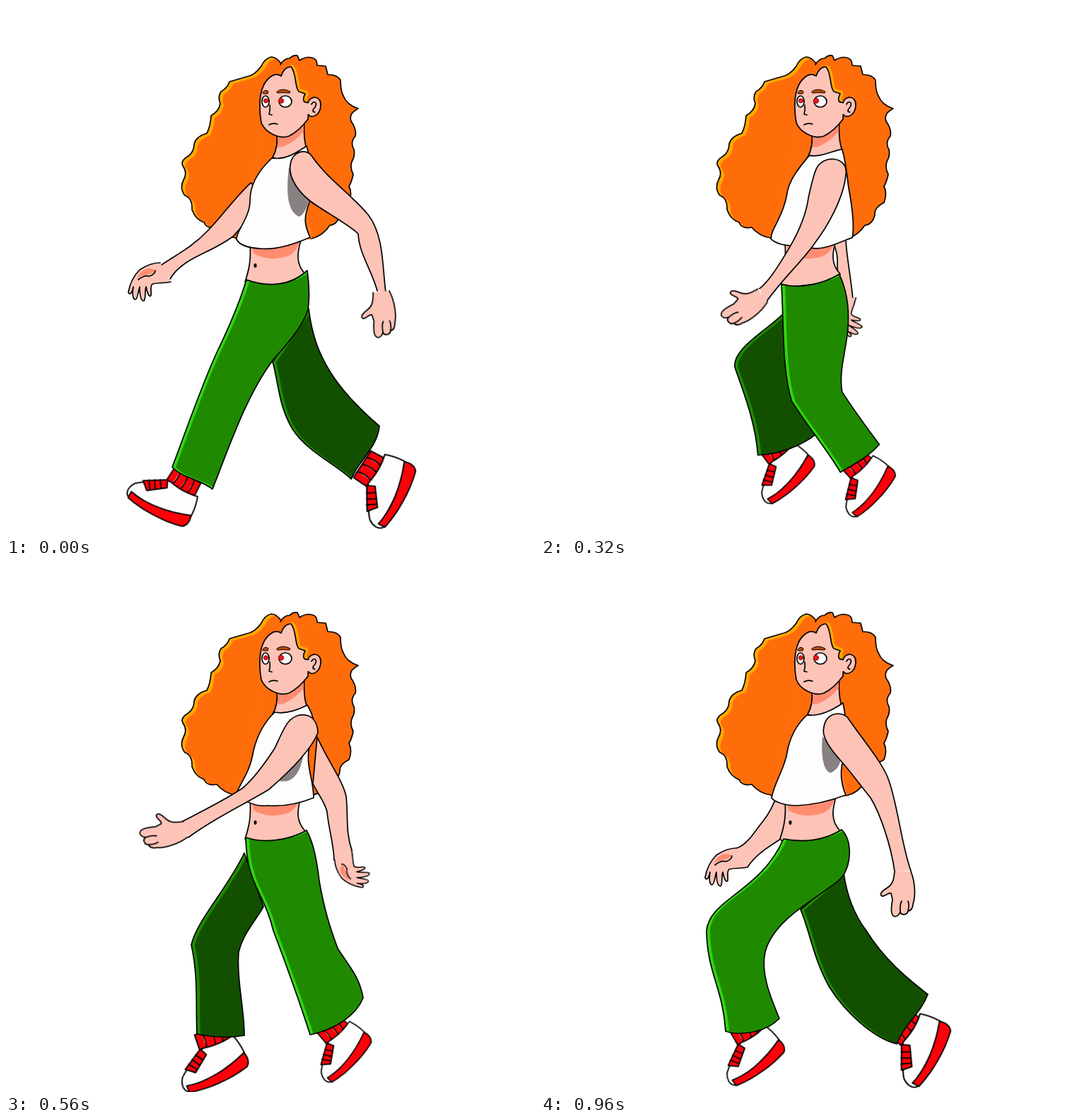
Animation, 748 px wide and 748 px high, one loop 1.04 s. Source, as an HTML page without scripts:

```html
<!DOCTYPE html>
<html lang="en">
<head>
<meta charset="utf-8">
<title>Walk cycle</title>
<style>
html,body{margin:0;width:100%;height:100%;overflow:hidden;background:#fff}
svg{display:block;width:100%;height:100%;fill:none;stroke:#000;stroke-width:1.7;stroke-linejoin:round;stroke-linecap:round}
.skin{fill:#fdc3b7}.blush{fill:#ff8c70;stroke:none}.white{fill:#fdfdfd}.red{fill:#fe0009}
.orange{fill:#ff6d0a}.gold{fill:#ffa800}.green{fill:#1f8a00}.lime{fill:#2fd40c}.dark{fill:#125000}
.flat{stroke:none}

/* seven key poses --a to --g; the steps fill in the frames between them */
.shape{d:var(--a);animation:shape 1.04s steps(2) infinite}
.move{transform:var(--a);animation:move 1.04s steps(2) infinite}
@keyframes shape{
0%,to{d:var(--a)}
15.38%{d:var(--b);animation-timing-function:steps(3)}
38.46%{d:var(--c)}
53.84%{d:var(--d);animation-timing-function:steps(1)}
61.53%{d:var(--e)}
76.92%{d:var(--f)}
92.3%{d:var(--g);animation-timing-function:steps(1)}
}
@keyframes move{
0%,to{transform:var(--a)}
15.38%{transform:var(--b);animation-timing-function:steps(3)}
38.46%{transform:var(--c)}
53.84%{transform:var(--d);animation-timing-function:steps(1)}
61.53%{transform:var(--e)}
76.92%{transform:var(--f)}
92.3%{transform:var(--g);animation-timing-function:steps(1)}
}
.near-leg{
--a:path("M340,387C370,398 402,396 426,374C429,395 429,415 427,430C418,455 400,475 378,500C340,550 315,625 292,683C272,668 250,668 235,652C255,600 275,540 298,490C315,455 330,420 340,387Z");
--b:path("M340,394C365,398 398,393 421,378C427,395 427,415 419,435C405,460 370,490 351,516C370,560 395,620 415,660C390,668 355,675 328,670C325,620 285,555 271,505C272,485 320,435 340,394Z");
--c:path("M340,393C365,401 398,394 422,380C433,400 440,430 442,460C446,500 446,525 463,560C478,577 495,586 510,600C500,622 485,635 471,654C445,632 420,610 396,585C375,530 355,455 340,393Z");
--d:path("M339,388C365,397 400,392 425,378C436,398 440,425 443,450C450,490 458,515 469,545C485,570 500,585 505,615C495,640 465,660 430,667C415,620 395,565 378,520C365,465 340,455 339,388Z");
--e:path("M341,388C370,398 405,393 427,379C433,395 430,410 426,420C412,450 385,465 375,488C390,530 415,590 440,638C425,655 395,665 367,673C355,620 315,550 304,493C310,455 330,420 341,388Z");
--f:path("M343,390C370,398 402,393 425,378C440,395 440,420 430,440C400,465 350,475 323,498C325,545 355,595 385,628C360,645 325,662 291,661C275,600 250,560 244,478C255,445 315,435 343,390Z");
--g:path("M343,390C372,396 402,392 425,377C440,392 440,425 425,445C400,470 330,500 317,550C310,580 325,615 337,644C320,662 285,670 261,662C257,600 235,580 234,520C238,475 310,465 343,390Z")}
.far-leg{
--a:path("M428,428C433,470 445,495 457,515C475,545 500,570 528,594C525,625 500,640 488,669C470,650 425,630 405,598C385,565 385,530 377,503Z");
--b:path("M405,455C412,490 430,530 445,555C460,580 475,600 486,617C465,638 440,652 412,655C400,625 378,575 365,545C358,530 352,520 351,512Z");
--c:path("M352,462C330,480 315,488 300,505C305,550 325,580 343,598C318,615 285,625 254,625C255,570 240,530 228,492C230,460 300,430 338,397Z");
--d:path("M364,486C350,510 335,525 329,550C326,590 337,630 337,668C315,672 290,670 270,666C268,620 272,585 262,540C270,505 310,465 337,410Z");
--e:path("M395,465C393,490 392,510 391,530C385,580 370,640 365,675C340,680 315,680 292,678C287,620 290,570 281,515C285,490 305,470 314,452Z");
--f:path("M430,436C431,480 430,510 433,545C440,590 455,640 459,682C435,684 395,684 369,678C366,640 358,610 360,580C364,540 366,520 366,480Z");
--g:path("M428,438C433,475 445,500 460,520C485,560 515,585 547,610C535,640 515,650 503,680C470,672 430,635 408,600C385,560 380,520 367,490Z")}
.near-arm{
--a:path("M525,403C518,375 499,350 498,322C480,305 440,285 428,274C405,255 400,235 402,225C404,205 425,200 433,213C455,245 490,268 512,295C535,325 532,370 537,405");
--b:path("M353,443C365,420 367,395 374,375C385,345 386,310 385,285C384,265 384,250 385,238C388,210 425,208 428,240C428,285 420,320 417,338C408,375 385,425 373,455");
--c:path("M287,378C305,370 325,345 340,325C355,305 370,285 375,262C382,245 386,232 392,225C405,210 435,215 433,232C430,265 395,310 375,330C350,355 320,365 290,402");
--d:path("M250,365C275,352 310,335 335,318C350,305 365,285 380,262C388,245 394,230 400,224C415,208 440,212 441,240C430,268 395,300 372,320C340,340 295,360 258,388");
--e:path("M268,383C290,372 310,358 330,342C350,320 362,300 370,272C378,255 384,240 391,228C405,205 437,208 437,242C428,275 390,315 362,345C335,365 305,378 283,405");
--f:path("M358,442C368,425 370,410 376,395C390,360 398,340 397,300C394,275 392,255 392,240C398,215 437,215 437,238C437,280 434,310 426,335C415,370 385,420 381,455");
--g:path("M500,436C495,400 480,355 466,332C450,312 435,292 426,282C408,262 396,245 400,232C403,210 428,208 436,222C455,250 485,285 492,308C505,345 510,400 523,435")}
.far-arm{
--a:path("M217,368C240,352 262,342 285,318C305,298 320,275 346,250L370,270C345,300 330,315 322,325C290,350 250,355 232,386");
--b:path("M296,404C310,395 318,380 325,370C335,355 345,345 355,320L385,330C375,355 355,380 342,390C330,402 320,425 307,430");
--c:path("M485,418C478,400 470,390 466,362C464,345 445,330 437,316L434,226C445,255 470,285 476,310C485,340 500,385 508,408");
--d:path("M464,420C463,395 456,375 454,352C452,340 440,325 434,312L440,246C455,280 475,305 481,330C484,360 480,380 489,406");
--e:path("M433,412C432,395 425,380 426,360C426,345 428,330 430,312L438,250C450,280 455,305 455,325C452,350 444,370 448,392");
--f:path("M375,400C375,385 378,370 380,350C380,330 380,310 385,290L410,280C412,300 412,320 412,345C410,370 400,385 395,400");
--g:path("M277,403C293,398 305,375 314,365C322,355 328,345 335,325L375,330C365,355 350,378 342,388C325,400 305,410 292,430")}
.top{
--a:path("M376,215C395,218 410,208 425,198C432,220 433,250 430,275C420,300 422,310 430,327C405,338 380,345 360,343C340,342 330,338 326,330C325,318 345,300 345,275C345,250 360,230 376,215Z");
--b:path("M378,212C395,214 410,205 427,201C428,225 430,245 434,255C445,285 450,310 445,326C425,335 400,345 382,345C360,345 340,340 324,333C322,320 335,300 342,275C345,250 365,235 378,212Z");
--c:path("M380,211C395,214 410,206 425,203C432,215 434,235 435,255C438,285 440,310 438,328C415,335 395,350 370,338C350,335 335,340 326,328C325,315 345,300 350,265C352,245 365,225 380,211Z");
--d:path("M380,211C395,214 412,208 426,201C435,215 440,235 430,255C422,285 435,305 435,332C415,340 395,345 370,343C350,345 335,335 326,325C335,305 345,295 350,265C355,245 365,225 380,211Z");
--e:path("M380,211C395,214 412,208 427,201C435,220 432,245 430,262C431,285 433,305 434,328C415,335 395,350 370,340C350,345 335,338 326,333C323,320 345,300 348,270C352,245 365,225 380,211Z");
--f:path("M378,213C395,214 412,208 426,201C430,215 430,240 428,260C420,285 415,310 410,335C390,338 365,345 350,347C335,345 325,335 324,322C327,305 350,285 350,260C352,240 365,225 378,213Z");
--g:path("M376,215C395,217 412,208 427,198C432,220 433,250 428,275C422,295 424,312 431,328C405,338 385,342 362,343C345,343 330,338 326,332C330,310 345,290 348,268C352,245 362,228 376,215Z")}
.shade{fill:#888182;
--a:path("M400,228C397,255 395,290 415,298C424,292 427,280 430,272Z");
--b:path("M400,250C400,265 400,285 405,290C412,285 415,270 415,255Z");
--c:path("M424,255C412,280 395,290 391,309C405,312 425,310 423,255Z");
--d:path("M420,270C410,285 390,295 385,308C405,312 415,300 421,270Z");
--e:path("M421,272C415,285 402,290 400,301C412,303 418,290 422,272Z");
--f:path("M400,250C400,265 400,285 405,290C412,285 415,270 415,255Z");
--g:path("M398,245C396,265 397,292 409,297C420,292 422,285 424,278Z")}
.near-hand{
--a:translate(531px,404px) rotate(-6deg);
--b:translate(363px,449px) rotate(31deg);
--c:translate(289px,390px) rotate(65deg);
--d:translate(254px,377px) rotate(75deg);
--e:translate(276px,394px) rotate(67deg);
--f:translate(371px,447px) rotate(32deg);
--g:translate(512px,436px) rotate(0deg)}
.far-hand{
--a:translate(225px,377px) rotate(0deg) scale(1);
--b:translate(301px,417px) rotate(-14deg) scale(.97);
--c:translate(497px,413px) rotate(-93deg) scale(.87);
--d:translate(477px,413px) rotate(-92deg) scale(.9);
--e:translate(440px,402px) rotate(-78deg) scale(1);
--f:translate(385px,400px) rotate(-40deg) scale(1);
--g:translate(284px,417px) rotate(0deg) scale(1)}
.near-shoe{
--a:translate(247px,682px) rotate(33deg) scale(1.1);
--b:translate(370px,690px) rotate(0deg) scale(1);
--c:translate(495px,636px) rotate(-62deg) scale(1);
--d:translate(469px,666px) rotate(-40deg) scale(1);
--e:translate(401px,673px) rotate(-35deg) scale(1);
--f:translate(324px,668px) rotate(-33deg) scale(1.1);
--g:translate(297px,670px) rotate(-30deg) scale(1.05)}
.far-shoe{
--a:translate(523px,659px) rotate(-56deg) scale(1.15);
--b:translate(450px,651px) rotate(-49deg) scale(1);
--c:translate(284px,627px) rotate(-30deg) scale(1.03);
--d:translate(296px,680px) rotate(-19deg) scale(1.13);
--e:translate(316px,677px) rotate(-25deg) scale(1.1);
--f:translate(405px,689px) rotate(-27deg) scale(1);
--g:translate(523px,662px) rotate(-55deg) scale(1.15)}
</style>
</head>
<body>
<svg viewBox="0 0 748 748">
<defs>
<g id="shoe">
<path class="red" d="M-21,-19L-21,0Q0,4 20,-2L18,-20ZM-12,-19Q-9,-8 -12,1M-1,-19Q2,-8 0,2M9,-19Q12,-8 10,0"/>
<path class="white" d="M-17,0C-30,12 -45,17 -53,27C-58,36 -56,44 -50,46C-25,50 5,46 27,40C35,32 29,8 24,-3Q5,3 -17,0Z"/>
<path class="red" d="M-51,38C-25,42 5,34 30,22C34,30 32,37 28,40C2,49 -30,50 -50,47Z"/>
<path class="red" d="M-20,0L-15,9L-35,26L-46,18ZM-28,5L-21,14M-34,9L-27,19M-40,13L-32,23"/>
</g>
<path id="hair-left" d="M390,83Q383,72 375,72Q366,74 361,85Q352,98 340,100L316,107Q313,116 304,121Q299,128 303,138Q301,149 290,155Q289,170 284,180Q269,184 266,195Q266,206 258,212Q246,219 250,226Q257,236 251,246Q245,258 253,268Q264,272 263,288Q268,302 280,306Q284,316 298,313Q309,326 325,328"/>
<clipPath id="hair-clip"><use href="#hair-left"/></clipPath>
</defs>

<path class="orange flat" d="M388,82L432,330L324,330Z"/>
<g class="flat" clip-path="url(#hair-clip)">
<use href="#hair-left" class="gold"/>
<use href="#hair-left" class="orange" x="5" y="3"/>
</g>
<use href="#hair-left"/>
<path class="orange" d="M388,83Q393,74 401,74Q406,69 412,70L415,77Q424,71 432,73Q440,74 440,84L452,85L455,97Q469,97 473,105Q473,120 477,127Q482,140 498,145Q484,152 488,163Q496,174 494,184Q486,193 492,203Q494,212 489,220Q486,229 491,238Q489,248 485,255Q490,265 485,278Q471,285 472,295Q469,309 458,310Q448,325 432,329"/>

<path class="far-arm shape skin"/>
<g class="far-hand move">
<path class="skin" d="M-7,-14C-20,-14 -30,-8 -36,-4C-46,6 -50,16 -52,28C-50,32 -47,30 -45,20C-47,32 -45,38 -42,38C-39,38 -38,26 -36,20C-36,32 -34,40 -30,40C-27,38 -29,26 -27,20C-25,30 -22,36 -20,32C-19,26 -22,20 -18,16C-8,14 0,15 8,13"/>
<path class="blush" d="M-40,8C-33,-6 -22,-9 -14,-3C-20,4 -32,2 -40,8Z"/>
<path d="M-38,10Q-30,3 -22,5Q-14,2 -14,-3"/>
</g>
<use class="far-shoe move" href="#shoe"/>
<g class="far-leg">
<clipPath id="far-clip"><path class="shape"/></clipPath>
<g class="flat" clip-path="url(#far-clip)">
<path class="shape green"/>
<g transform="translate(5 1)"><path class="shape dark"/></g>
</g>
<path class="shape"/>
</g>

<use class="near-shoe move" href="#shoe"/>
<path class="skin" d="M345,335C347,360 343,375 338,390L345,398L420,390L423,379C410,365 411,350 418,328Z"/>
<path class="blush" d="M347,335L416,330Q412,348 398,354Q372,362 350,350Z"/>
<ellipse cx="352.500" cy="367" rx="1.200" ry="2.200" fill="#000"/>
<g class="near-leg">
<clipPath id="near-clip"><path class="shape"/></clipPath>
<g class="flat" clip-path="url(#near-clip)">
<path class="shape lime"/>
<g transform="translate(5 0)"><path class="shape green"/></g>
<path class="green" d="M347,387H432V400H347Z"/>
</g>
<path class="shape"/>
</g>

<path class="skin" d="M383,180Q385,200 377,214L400,222L426,204Q420,190 422,160Z"/>
<path class="blush" d="M384,186Q405,186 421,168V177Q410,191 392,199L384,200Z"/>
<path class="top shape white"/>
<path class="shade shape flat"/>
<path class="near-arm shape skin"/>
<g class="near-hand move">
<path class="skin" d="M-12,0C-13,10 -14,18 -22,23C-30,28 -34,32 -30,35C-26,36 -22,30 -17,31L-15,40C-17,52 -18,62 -12,64C-7,64 -5,60 -4,57C-3,63 6,62 7,56C12,56 14,50 14,46C18,35 17,15 11,0"/>
<path d="M-4,57Q-5,48 -2,42M7,56Q9,48 7,42"/>
</g>

<path stroke="#ffa800" stroke-width="9" d="M404,88C411,97 408,115 414,121L423,124Q420,130 422,136"/>
<path class="skin" d="M389,99C391,92 396,86 403,86C411,95 408,115 414,121L423,124C419,132 420,138 428,136L427,160C418,172 408,180 400,184C385,189 366,178 361,165C358,150 358,130 362,118C366,105 378,92 389,99Z"/>
<path class="skin" d="M427,137C430,126 446,126 445,141C444,155 432,160 427,153"/>
<path d="M432,139C435,133 441,136 437,143C433,147 433,150 437,150"/>
<path class="skin flat" d="M421,139L428,138V152L421,158Z"/>
<ellipse class="white" cx="395" cy="135" rx="9" ry="8"/>
<ellipse class="white" cx="367" cy="135" rx="5" ry="8"/>
<g fill="#f01818" stroke="#8c0000" stroke-width="1">
<circle cx="389" cy="134" r="3.500"/><circle cx="367.500" cy="134" r="3"/>
</g>
<g fill="#c14a00" stroke-width="1">
<path d="M383,121Q391,115 402,121L401,123Q391,122 384,123Z"/>
<path d="M363,122Q367,117 371,121L370,124L364,124Z"/>
</g>
<path d="M373,140Q374,147 372,153L376,154M372,168Q377,165 384,167"/>
</svg>
</body>
</html>
```
